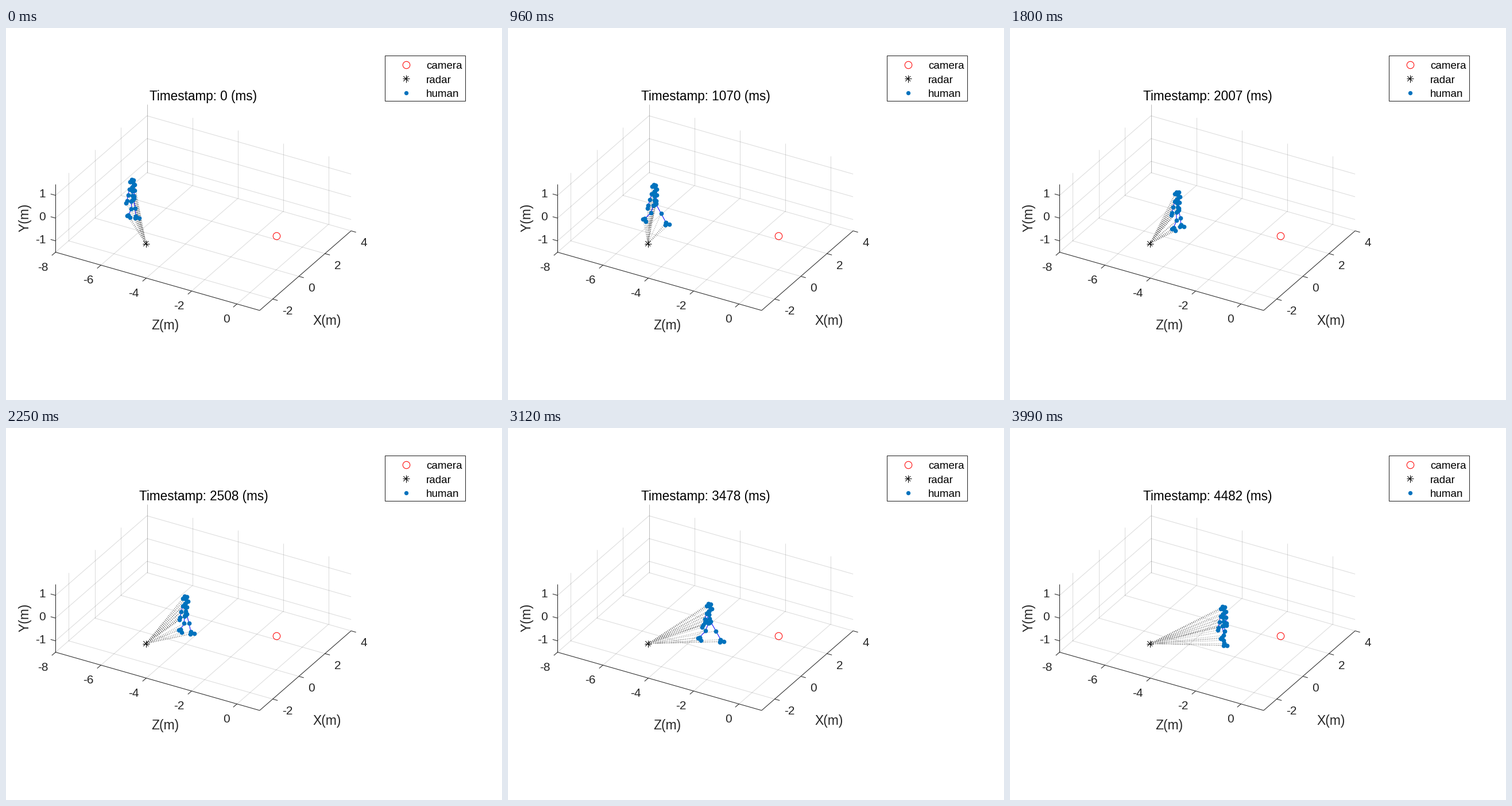
Recreate the animation shown at these times as a matplotlib script. Size 864x648 px, loop 4020 ms.

```python
import numpy as np
import matplotlib.pyplot as plt
from matplotlib.animation import FuncAnimation
from matplotlib.patches import Rectangle

W, H, DPI = 864, 648, 150
FRAMES, STEP = 134, 30
THIN = 0.5
INK, BLUE = "#262626", (0, 0.447, 0.741)
GAP = [(np.nan, np.nan)]

plt.rcParams["font.family"] = "Liberation Sans"
fig = plt.figure(figsize=(W / DPI, H / DPI), dpi=DPI, facecolor="white")
ax = fig.add_axes([0, 0, 1, 1])
ax.set(xlim=(0.3, W + 0.3), ylim=(H + 0.3, 0.3))
ax.axis("off")


def project(x, y, z):
    """Orthographic view of the room, in stage pixels."""
    return np.array([470.9 + 22.75 * x + 39.5 * z,
                     362.2 - 19.8 * x - 39.6 * y + 11.27 * z])


def line(a, b, color=INK, z=1):
    ax.plot([a[0], b[0]], [a[1], b[1]], color=color, lw=THIN, zorder=z,
            solid_capstyle="butt")


def label(x, y, s, size=10, ha="center", color=INK, **kw):
    return ax.text(x, y, s, fontsize=size, ha=ha, color=color,
                   **{"va": "baseline", **kw})


def marker(x, y, kind):
    if kind == "camera":
        ax.plot(x, y, "o", ms=6, mfc="none", mec="red", mew=THIN, zorder=6)
    elif kind == "radar":
        for a in np.arange(4) * np.pi / 4:
            dx, dy = 6.2 * np.cos(a), 6.2 * np.sin(a)
            line((x - dx, y - dy), (x + dx, y + dy), "black", 6)
    else:
        ax.plot(x, y, "o", ms=3.5, color=BLUE, mew=0, zorder=6)


# Room: x in [-3, 4], y in [-1.5, 1.5], z in [-8, 1]
X0, X1, Y0, Y1, Z0, Z1 = -3, 4, -1.5, 1.5, -8, 1
GRID = (0.15, 0.15, 0.15, 0.16)
for x in (-2, 0, 2, 4):
    line(project(x, Y0, Z0), project(x, Y0, Z1), GRID)
    line(project(x, Y0, Z0), project(x, Y1, Z0), GRID)
    p = project(x, Y0, Z1)
    line(p, p + (8.6, 2.4))
    label(p[0] + 16.5, p[1] + 26.8, str(x), ha="left")
for z in (-8, -6, -4, -2, 0):
    line(project(X0, Y0, z), project(X1, Y0, z), GRID)
    line(project(X1, Y0, z), project(X1, Y1, z), GRID)
    p = project(X0, Y0, z)
    line(p, p + (-6.5, 5.6))
    label(p[0] - 12.8, p[1] + 32.3, str(z), ha="right")
for y in (-1, 0, 1):
    line(project(X0, y, Z0), project(X1, y, Z0), GRID)
    line(project(X1, y, Z0), project(X1, y, Z1), GRID)
    p = project(X0, y, Z0)
    line(p, p + (-8.6, -2.4))
    label(p[0] - 17, p[1] + 3.8, str(y), ha="right")
line(project(X0, Y0, Z0), project(X0, Y1, Z0))
line(project(X0, Y0, Z0), project(X0, Y0, Z1))
line(project(X0, Y0, Z1), project(X1, Y0, Z1))

label(277.5, 525.5, "Z(m)", 11)
label(559, 517, "X(m)", 11)
label(33, 331, "Y(m)", 11, rotation=90, va="center")
title = label(344.3, 126.5, "", 10.8, color="black")

RADAR = np.array([244, 376])
marker(471, 362.7, "camera")
marker(*RADAR, "radar")

ax.add_patch(Rectangle((660, 48), 140.5, 79.5, fc="white", ec=INK, lw=THIN))
for i, name in enumerate(("camera", "radar", "human")):
    marker(697, 64 + 24.7 * i, name)
    label(732.5, 71.2 + 24.7 * i, name, 9, ha="left", color="black")

rays, = ax.plot([], [], color="0.5", lw=THIN, ls=(0, (1, 2)),
                dash_capstyle="butt", zorder=3)
bones, = ax.plot([], [], color="blue", lw=THIN, zorder=4)
joints, = ax.plot([], [], "o", ms=3.7, color=BLUE, mew=0, zorder=5)

# Path of the hips across the stage
T = [0, 18, 45, 75, 87, 104, 133]
HIP_X = [220.5, 239, 271, 313, 328, 351, 372]
HIP_Y = [300.5, 303.5, 312, 326.5, 331, 339, 344]
STRIDE = 38
FORWARD = np.array([39.5, 11.27])
SIDE = np.array([22.75, -19.8])


def arm(shoulder, tilt):
    steps = [(0, 0), (tilt, 10), (2 * tilt, 20), (2.5 * tilt, 24.5)]
    return [shoulder + np.array(s) for s in steps]


def leg(hip, side, reach, lift):
    """One leg; reach is the foot's lead over the hips in metres."""
    top = hip + side * 0.09 * SIDE
    ankle = hip + (0, 28.5 - lift) + reach * FORWARD + side * 0.1 * SIDE
    ankle[0] += 6 * abs(reach) - 1
    lead = np.clip(0.5 + 3 * reach, 0, 1)
    knee = (top + ankle) / 2 + (0.5 + 2.7 * (1 - lead), 0.8)
    heel = ankle + (-3 + 2 * lead, 1 + 3 * lead)
    toe = ankle + (2 + 4 * lead, 5 - 2 * lead)
    return [hip, top, knee, ankle, heel, toe, ankle]


def body(n):
    """Joint chains of the walker."""
    hip = np.array([np.interp(n, T, HIP_X), np.interp(n, T, HIP_Y)])
    neck = hip - (0.5, 23.5 - 3.5 * min(n / 87, 1))
    phase = 2 * np.pi * (n - 87) / STRIDE
    gap = -0.86 * np.cos(phase)
    lift = 4 * np.sin(phase)
    swing = np.clip((n - 40) / 47, 0, 1)
    left, right = neck + 0.2 * SIDE, neck - 0.2 * SIDE
    face = [(0, 0), (1, -8), (-4, -9), (-1, -12.3), (2.5, -11.8)]
    return [
        [neck + np.array(f) for f in face],
        [neck + s * (hip - neck) for s in (0, 0.33, 0.66, 1)],
        [neck] + arm(left, -5 * gap * swing - 0.6),
        [neck] + arm(right, -2.1 - gap),
        leg(hip, 1, gap / 2, max(lift, 0)),
        leg(hip, -1, -gap / 2, max(-lift, 0)),
    ]


def draw(n):
    chains = body(n)
    pts = np.array([p for c in chains for p in c])
    joints.set_data(pts[:, 0], pts[:, 1])
    bones.set_data(*np.array([p for c in chains for p in [*c, *GAP]]).T)
    spots = np.unique(pts.round(3), axis=0)
    rays.set_data(*np.array([q for p in spots for q in (RADAR, p, *GAP)]).T)
    # The clock skips one tick late in the walk
    tick = n + (n > 118)
    title.set_text(f"Timestamp: {round(tick * 33.4445)} (ms)")
    return rays, bones, joints, title


anim = FuncAnimation(fig, draw, frames=FRAMES, interval=STEP, repeat=True,
                     repeat_delay=0, blit=False)
plt.show()
```
